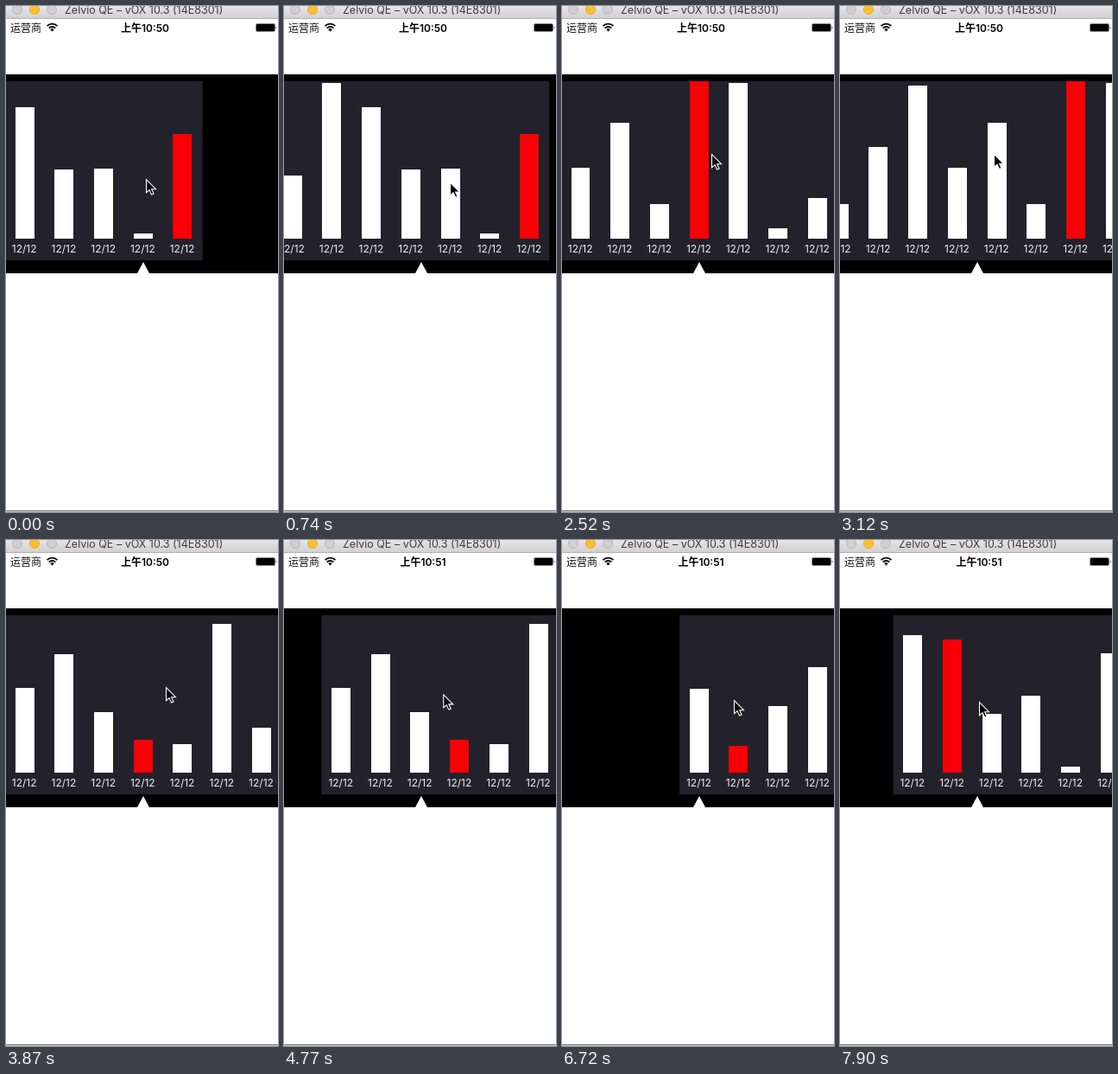
Write an HTML page that moves like this. It is 315 by 585 pixels and loops after 8000 ms.

```html
<!DOCTYPE html>
<html lang="zh">
<head>
<meta charset="utf-8">
<title>Bar picker</title>
<style>
html, body { margin: 0; width: 100%; height: 100%; overflow: hidden; background: #fff; }
svg { display: block; width: 315px; height: 585px; }
text { font: 12px Inter, "Noto Sans CJK SC", "Noto Sans CJK", sans-serif; }
#title { font-size: 12.5px; }
#clock { font-weight: 600; }
</style>
</head>
<body>
<svg viewBox="0 0 315 585">
  <defs>
    <linearGradient id="chrome" x2="0" y2="1">
      <stop stop-color="#e6e4e7"/><stop offset="1" stop-color="#d2d0d3"/>
    </linearGradient>
  </defs>
  <rect width="315" height="585" fill="#fff"/>
  <rect width="315" height="14" fill="url(#chrome)"/>
  <rect y="14" width="315" height="1" fill="#b3b1b4"/>
  <g fill="#d0ced1" stroke="#b9b7ba">
    <circle cx="13" cy="4" r="5.5"/>
    <circle cx="33" cy="4" r="5.5" fill="#fdbe2f" stroke="#e6ab2c"/>
    <circle cx="53" cy="4" r="5.5"/>
  </g>
  <text id="title" x="68" y="9" fill="#3c3b3d">Zelvio QE – vOX 10.3 (14E8301)</text>

  <text x="5" y="30" fill="#111">运营商</text>
  <g fill="none" stroke="#000" stroke-width="1.8">
    <path d="M47.6 23.2a8.2 8.2 0 0 1 11.8 0M49.7 25.6a5.3 5.3 0 0 1 7.6 0"/>
    <path d="M51.3 27.2a3 3 0 0 1 4.4 0L53.5 29.6z" fill="#000" stroke="none"/>
  </g>
  <text id="clock" x="161" y="29.5" text-anchor="middle"></text>
  <rect x="289.5" y="20.5" width="22" height="9" rx="1.5" fill="#fff" stroke="#888"/>
  <rect x="290" y="21" width="21" height="8" rx="1"/>
  <path d="M312.7 23.3q1.6 1.7 0 3.4z"/>

  <rect y="79" width="315" height="230"/>
  <g id="strip"></g>
  <path d="M159 296L166 309H152z" fill="#fff"/>
  <rect y="583" width="315" height="1" fill="#7b7b7b"/>
  <rect y="584" width="315" height="1" fill="#c4c4c4"/>
  <path id="cursor" d="M.5 .7V15.7L4 12.6L6.5 18L9 17L6.6 11.7H11.4z" stroke="#fff" stroke-width="1.1"/>
</svg>
<script>
const PITCH = 320 / 7, COUNT = 20, BASE = 269, LOOP = 8000;
const $ = id => document.getElementById(id);

// Each swipe eases to a bar; once at rest that bar turns red and the heights reload.
// "heights" starts at bar "first"; the other bars are random.
const swipes = [
  { from: -1, to: -1, index: 18, red: 19, first: 8, heights: [83, 126, 40, 155, 70, 73, 180, 152, 80, 81, 6, 121] },
  { from: 0, to: 15.05, index: 8, first: 5, heights: [82, 134, 40, 182, 180, 12, 47] },
  { from: 17, to: 25, index: 3, first: 0, heights: [98, 137, 70, 38, 33, 172, 52] },
  { from: 26, to: 32.63, index: 2 },
  { from: 35, to: 40, index: 1, first: 0, heights: [97, 31, 77, 122] },
  { from: 41, to: 45, index: 0 },
  { from: 46, to: 50, index: 1, first: 0, heights: [159, 154, 68, 89, 7, 138] },
  { from: 50, to: 55.1, index: 2 }
];
// Where the mouse pauses: step, x, y.
const pauses = [[0, 162, 200], [9, 234, 208], [17, 173, 171], [26, 185, 170], [35, 184, 181], [45, 199, 185], [53, 161, 187]];

function add(parent, tag, attrs) {
  const el = document.createElementNS("http://www.w3.org/2000/svg", tag);
  set(el, attrs);
  return parent.appendChild(el);
}

function set(el, attrs) {
  for (const k in attrs) el.setAttribute(k, attrs[k]);
}

function ease(from, to, s) {
  const u = Math.min(1, Math.max(0, (s - from) / (to - from)));
  return u * u * (3 - 2 * u);
}

function random(seed) {
  const v = Math.sin(seed * 12.9898) * 43758.5453;
  return v - Math.floor(v);
}

const strip = $("strip");
add(strip, "rect", { y: 87, width: COUNT * PITCH, height: 207, fill: "#23222c" });
const bars = Array.from({ length: COUNT }, (_, i) => {
  add(strip, "text", { x: i * PITCH + 22.2, y: 285, fill: "#ededf0", "text-anchor": "middle" }).textContent = "12/12";
  return add(strip, "rect", { x: i * PITCH + 11.5, width: 22, "shape-rendering": "crispEdges" });
});

function scrollAt(s) {
  return swipes.slice(1).reduce((at, w) => at + (w.index - at) * ease(w.from, w.to, s), swipes[0].index);
}

function mouseAt(s) {
  const n = pauses.findLastIndex(p => p[0] <= s);
  const a = pauses[n], b = pauses[n + 1] ?? a;
  const u = a === b ? 0 : ease(a[0], b[0], s);
  return [a[1] + (b[1] - a[1]) * u, a[2] + (b[2] - a[2]) * u];
}

// The picture advances in steps of 150 ms, a few of them slightly shorter.
function stepAt(t) {
  return Math.floor((t + (t >= 1190) * 10 + (t >= 2370) * 20 + (t >= 7900) * 20) / 150);
}

function draw(s) {
  const n = swipes.findLastIndex(w => w.to < s);
  const { index, red = index, first, heights } = swipes[n];
  bars.forEach((bar, i) => {
    const height = heights?.[i - first] ?? Math.round(5 + 175 * random(n * 31 + i + 1));
    set(bar, { y: BASE - height, height, fill: i === red ? "#f80005" : "#fff" });
  });
  set(strip, { transform: `translate(${(3 - scrollAt(s)) * PITCH - 1})` });
  set($("cursor"), { transform: `translate(${mouseAt(s)})` });
  $("clock").textContent = s < 31 ? "上午10:50" : "上午10:51";
}

const start = performance.now();
let last = -1;
function tick() {
  const s = stepAt((performance.now() - start) % LOOP);
  if (s !== last) draw(last = s);
  requestAnimationFrame(tick);
}
tick();
</script>
</body>
</html>
```
